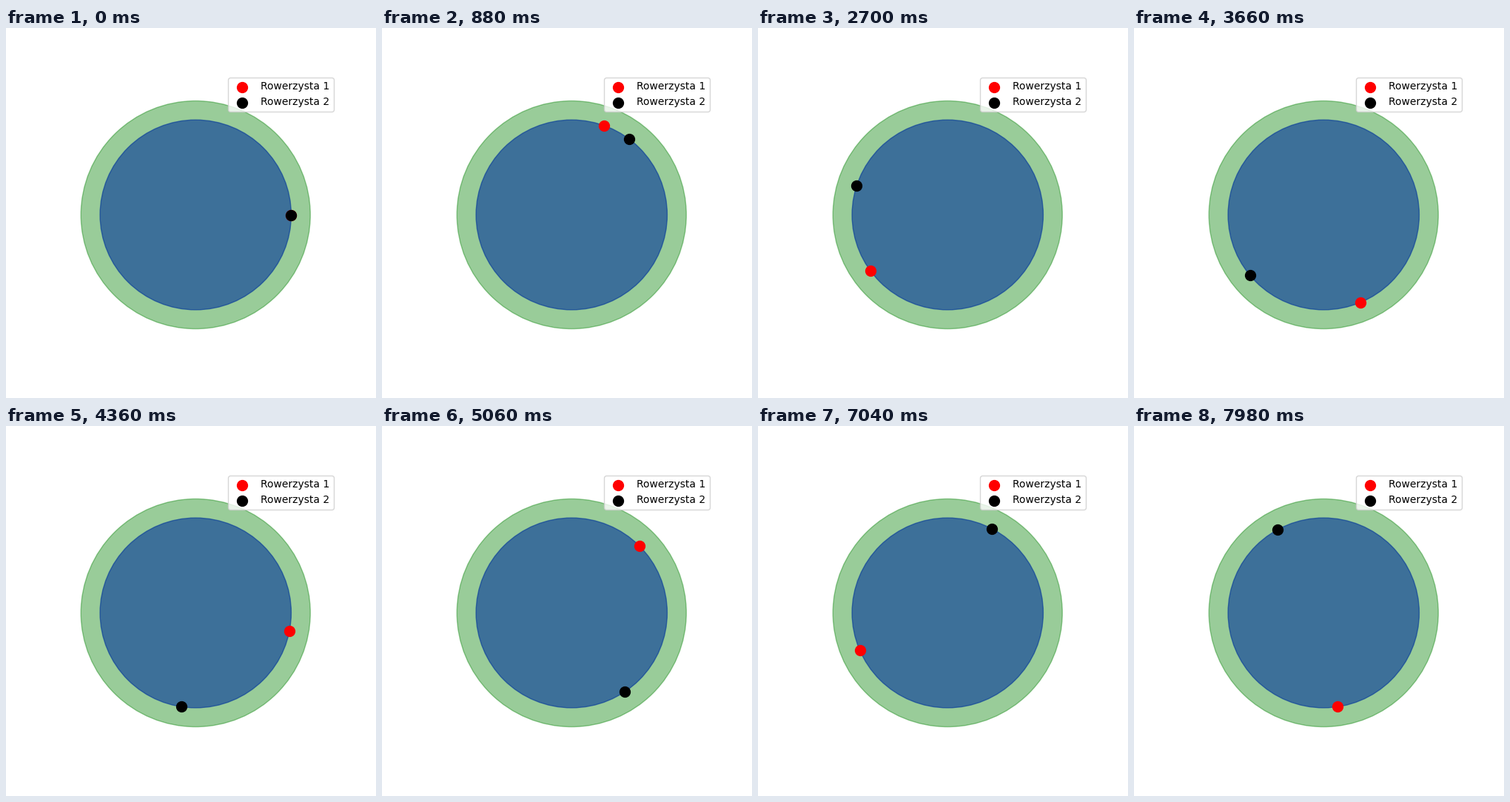
Animation of 500x500 px, one loop 8 s. Source, as a matplotlib script:

```python
import numpy as np
import matplotlib.pyplot as plt
from matplotlib.animation import FuncAnimation

FRAMES = 400
INTERVAL = 20       # ms
TRACK = 10          # radius of the riders' path
SPEEDS = (1.6, 1.2)  # degrees per frame

fig, ax = plt.subplots(figsize=(5, 5), dpi=100)
ax.set_xlim(-15, 15)
ax.set_ylim(-15, 15)
ax.axis("off")

ax.add_patch(plt.Circle((0, 0), 12, color="green", alpha=0.4))
ax.add_patch(plt.Circle((0, 0), TRACK, color="#003399", alpha=0.6))

riders = [
    ax.scatter([TRACK], [0], s=100, color=color, label=f"Rowerzysta {i}")
    for i, color in enumerate(("red", "black"), 1)
]
ax.legend(loc="upper right")


def update(frame):
    for rider, speed in zip(riders, SPEEDS):
        angle = np.radians(speed * frame)
        rider.set_offsets([[TRACK * np.cos(angle), TRACK * np.sin(angle)]])
    return riders


anim = FuncAnimation(fig, update, frames=FRAMES, interval=INTERVAL,
                     init_func=lambda: update(0), repeat=True, repeat_delay=0)
plt.show()
```
